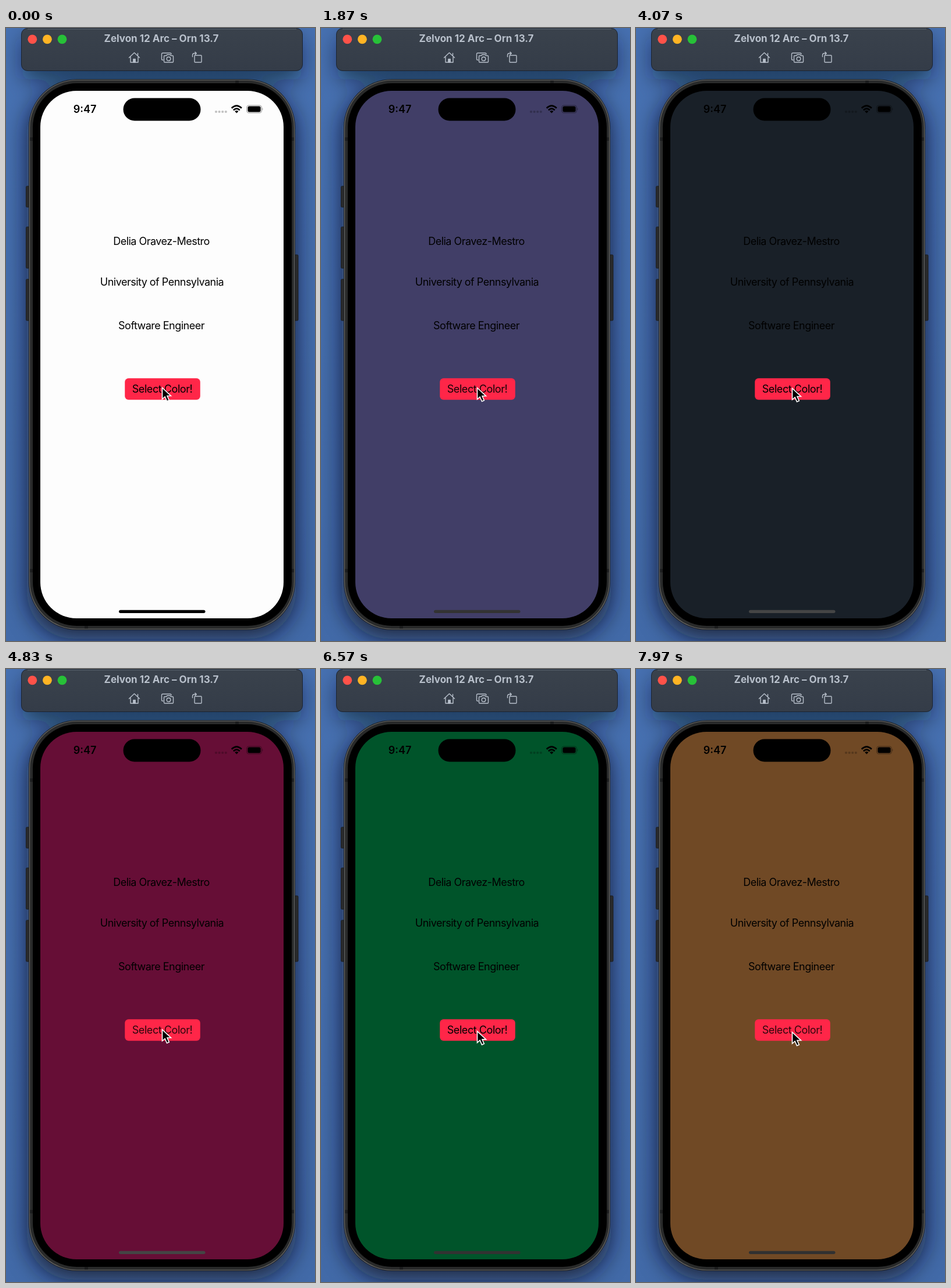
Animation, 531 px wide and 1054 px high, one loop 8 s. Source, as an HTML page:

```html
<!DOCTYPE html>
<html lang="en">
<head>
<meta charset="utf-8">
<title>Color picker demo</title>
<style>
  html, body { margin: 0; width: 100%; height: 100%; overflow: hidden; background: #446dab; }
  svg { display: block; width: 100vw; height: 100vh; }
  text { font: 18px Inter, Roboto, sans-serif; text-anchor: middle; }
  .label { letter-spacing: -.52px; }
  .button { letter-spacing: -.44px; }
  .time { font-weight: 600; }
  .title { font-size: 17px; font-weight: 700; fill: #b9c1cc; }
  .icons { fill: none; stroke: #b7bfca; stroke-width: 1.4; stroke-linejoin: round; stroke-linecap: round; }
</style>
</head>
<body>
<svg viewBox="0 0 531 1054" preserveAspectRatio="none">
  <defs>
    <linearGradient id="wall" x2="0" y2="1">
      <stop stop-color="#4771b2"/><stop offset="1" stop-color="#426aa8"/>
    </linearGradient>
    <linearGradient id="bar" x2="0" y2="1">
      <stop stop-color="#3a424c"/><stop offset="1" stop-color="#343c48"/>
    </linearGradient>
    <filter id="blur" x="-30%" y="-30%" width="160%" height="160%">
      <feGaussianBlur stdDeviation="19"/>
    </filter>
  </defs>
  <rect width="531" height="1054" fill="url(#wall)"/>
  <g filter="url(#blur)" fill="#0a1220">
    <rect x="36" y="102" width="462" height="948" rx="80" opacity=".74"/>
    <rect x="29" y="18" width="478" height="70" rx="10" opacity=".58"/>
  </g>

  <!-- simulator toolbar -->
  <rect x="26.5" y=".5" width="483" height="73" rx="10.5" fill="url(#bar)" stroke="#1b2330"/>
  <path d="M37 1.7H499" stroke="#616a75"/>
  <circle cx="45.3" cy="19.3" r="7.9" fill="#ff5249"/>
  <circle cx="70.9" cy="19.3" r="7.9" fill="#ffb424"/>
  <circle cx="96.5" cy="19.3" r="7.9" fill="#27c138"/>
  <text class="title" x="267" y="24.3">Zelvon 12 Arc – Orn 13.7</text>
  <g class="icons">
    <path d="M211.5 51L220.5 42.5L229.5 51M214 50V59H227V50M226.5 43.5V47"/>
    <path d="M218.8 59V53.5H222.2V59Z" fill="#b7bfca"/>
    <path d="M270 55H269Q267.5 55 267.5 53V45Q267.5 43 269.5 43H282Q284 43 284 45"/>
    <path d="M273 47.5H275.5L277 45.8H282L283.5 47.5H286Q287.5 47.5 287.5 49V57.5Q287.5 59 286 59H273Q271.5 59 271.5 57.5V49Q271.5 47.5 273 47.5Z"/>
    <circle cx="279.5" cy="53" r="3.3"/>
    <rect x="324" y="47" width="12" height="12" rx="1"/>
    <path d="M320.5 49.5V47Q320.5 43.5 324 43.5H327M325 41.3L327.3 43.5L325 45.7"/>
  </g>

  <!-- phone body -->
  <g fill="#292a2b" stroke="#1d1f21">
    <rect x="34.5" y="272" width="8" height="36" rx="1.5"/>
    <rect x="34.5" y="342" width="8" height="71" rx="1.5"/>
    <rect x="34.5" y="432" width="8" height="71" rx="1.5"/>
    <rect x="494" y="390" width="8" height="113" rx="1.5"/>
  </g>
  <rect x="39" y="88" width="458" height="947" rx="83" fill="#1b1c1d"/>
  <rect x="40.5" y="89.5" width="455" height="944" rx="81.5" fill="#292a2a" stroke="#686969" stroke-width="1.2"/>
  <path d="M41 191H46M491 191H495M41 933H46M491 933H495M397 90V95M138 1028V1033" stroke="#1c1d1e" stroke-width="6"/>
  <rect x="46" y="95" width="445" height="933" rx="76"/>
  <rect id="screen" x="59" y="108" width="418" height="907" rx="62"/>

  <!-- status bar -->
  <rect x="201.5" y="120.5" width="133" height="39" rx="19.5"/>
  <text class="time" x="135.5" y="146">9:47</text>
  <g opacity=".23">
    <circle cx="361" cy="144" r="2.1"/><circle cx="366.6" cy="144" r="2.1"/>
    <circle cx="372.2" cy="144" r="2.1"/><circle cx="377.8" cy="144" r="2.1"/>
  </g>
  <g fill="none" stroke="#000" stroke-width="2.6">
    <path d="M387.7 137.7Q396.3 129.5 404.9 137.7M390.9 141.2Q396.3 136 401.7 141.2"/>
    <path d="M393.2 143.3Q396.3 140.6 399.4 143.3L396.3 146.5Z" fill="#000" stroke="none"/>
  </g>
  <rect x="413.7" y="133" width="25.6" height="13" rx="4" fill="none" stroke="#000" stroke-width="1.1" opacity=".4"/>
  <rect x="415.4" y="134.6" width="22.2" height="9.8" rx="2.6"/>
  <path d="M440.5 137.3Q442.5 139.5 440.5 141.7Z" opacity=".4"/>

  <!-- app -->
  <text class="label" x="267" y="373">Delia Oravez-Mestro</text>
  <text class="label" x="268" y="443">University of Pennsylvania</text>
  <text class="label" x="267" y="517.5">Software Engineer</text>
  <rect x="204.5" y="602.5" width="129" height="36.5" rx="6" fill="#ff2648" stroke="#ff2648" stroke-opacity=".5"/>
  <text id="caption" class="button" x="268.5" y="627.2">Select Color!</text>
  <rect id="home" x="194" y="1000.7" width="148.5" height="5.3" rx="2.65"/>
  <path id="cursor" d="M0 0V19.5L4.6 15.5L8 23.2L11.8 21.5L8.5 14H15Z" stroke="#fff" stroke-width="1.6"/>
</svg>
<script>
const LOOP = 8000, FADE = 300, RELEASE = 450;
// start time, screen colour, home indicator grey
const states = [
  [-1000, '#fdfdfd', 0],
  [1500, '#413e67', 51],
  [3200, '#192028', 69],
  [4550, '#660e36', 68],
  [5820, '#00542a', 50],
  [6800, '#665f48', 42],
  [7700, '#704925', 50]
];
const drift = [[0, 618.5], [3330, 619], [4830, 620], [5900, 621.5], [7100, 624], [LOOP, 624.5]];
const [screenEl, home, caption, cursor] =
  ['screen', 'home', 'caption', 'cursor'].map(id => document.getElementById(id));
const mix = (a, b, k) => a + (b - a) * Math.min(1, k);

function draw(now) {
  const t = now % LOOP;
  const i = states.findLastIndex(s => s[0] <= t);
  const [start, color, grey] = states[i];
  const before = states[Math.max(0, i - 1)][2];
  const g = mix(before, grey, (t - start) / FADE);
  screenEl.setAttribute('fill', color);
  home.setAttribute('fill', `rgb(${g},${g},${g})`);
  // the caption darkens again after each press
  caption.setAttribute('opacity', mix(.55, 1, (t - start) / RELEASE));

  const j = drift.findLastIndex(p => p[0] <= t);
  const [t0, y0] = drift[j], [t1, y1] = drift[j + 1];
  const y = mix(y0, y1, (t - t0) / (t1 - t0));
  cursor.setAttribute('transform', `translate(268.5 ${y})`);
}

const origin = performance.now();
function tick() {
  draw(performance.now() - origin);
  requestAnimationFrame(tick);
}
tick();
</script>
</body>
</html>
```
